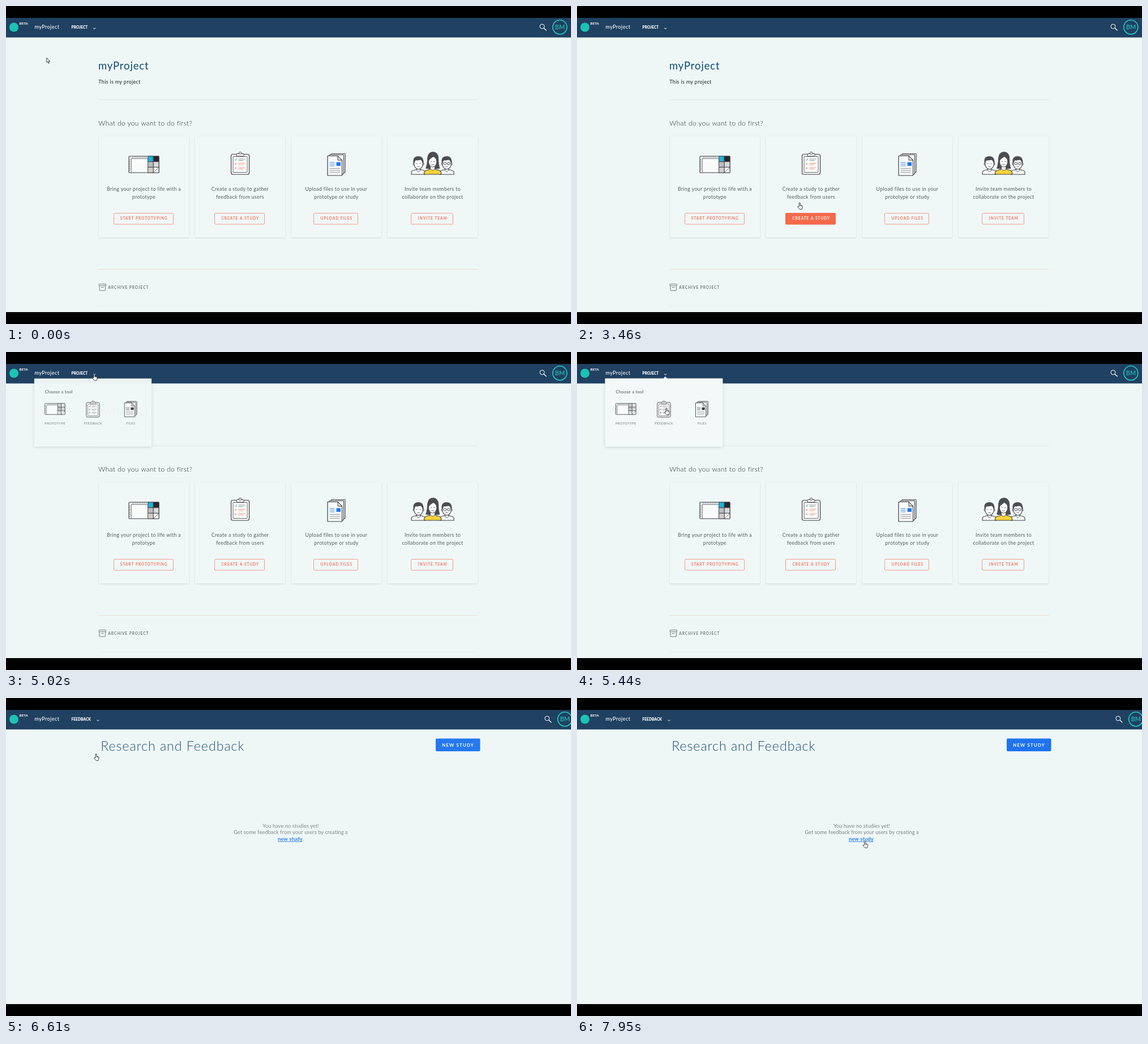
An HTML page with a canvas that plays this animation: 998 by 561 pixels, repeating every 8000 ms.

```html
<!DOCTYPE html>
<html lang="en">
<head>
<meta charset="utf-8">
<title>Project dashboard</title>
<style>
  html, body { margin: 0; width: 100%; height: 100%; overflow: hidden; background: #000; }
  canvas { display: block; width: 998px; height: 561px; }
</style>
</head>
<body>
<canvas id="stage"></canvas>
<script>
const W = 998, H = 561, LOOP = 8000;
const BG = '#eef7f6', INK = '#3b3d42', CORAL = '#f3735c', TEAL = '#1fcfc9';
const canvas = document.getElementById('stage');
const dpr = window.devicePixelRatio || 1;
canvas.width = W * dpr;
canvas.height = H * dpr;
const c = canvas.getContext('2d');

const clamp = v => Math.max(0, Math.min(1, v));
const ramp = (t, a, b) => clamp((t - a) / (b - a));
const easeOut = (p, n = 3) => 1 - (1 - p) ** n;
const smooth = p => p * p * (3 - 2 * p);
const mix = (a, b, p) => a + (b - a) * p;

function text(str, x, y, size, color, { weight = 400, space = 0, center = false, style = '' } = {}) {
  c.font = `${style} ${weight} ${size}px Lato, sans-serif`;
  c.letterSpacing = space + 'px';
  c.fillStyle = color;
  const w = center ? c.measureText(str).width - space : 0;
  c.fillText(str, x - w / 2, y);
}

function box(x, y, w, h, r, fill, stroke, lw = 1) {
  c.beginPath();
  c.roundRect(x, y, w, h, r);
  if (fill) { c.fillStyle = fill; c.fill(); }
  if (stroke) { c.strokeStyle = stroke; c.lineWidth = lw; c.stroke(); }
}

function line(color, lw, ...pts) {
  c.beginPath();
  for (let i = 0; i < pts.length; i += 2) c.lineTo(pts[i], pts[i + 1]);
  c.strokeStyle = color;
  c.lineWidth = lw;
  c.stroke();
}

function shape(d, fill, stroke, lw = 1) {
  const p = new Path2D(d);
  if (fill) { c.fillStyle = fill; c.fill(p); }
  if (stroke) { c.strokeStyle = stroke; c.lineWidth = lw; c.stroke(p); }
}

function oval(x, y, rx, ry, fill, stroke, lw = 1) {
  c.beginPath();
  c.ellipse(x, y, rx, ry, 0, 0, 7);
  if (fill) { c.fillStyle = fill; c.fill(); }
  if (stroke) { c.strokeStyle = stroke; c.lineWidth = lw; c.stroke(); }
}

function at(x, y, scale, draw) {
  c.save();
  c.translate(x, y);
  c.scale(scale, scale);
  draw();
  c.restore();
}

function shadowed(blur, dy, color, draw) {
  c.save();
  c.shadowBlur = blur * dpr;
  c.shadowOffsetY = dy * dpr;
  c.shadowColor = color;
  draw();
  c.restore();
}

// Icons are drawn around their own centre.
function boardIcon(tint = true) {
  box(-26.5, -14.5, 53, 29, 1, '#fafcfc', INK, 1.2);
  line(INK, .8, -22.5, -10.5, 7, -10.5);
  line(INK, .8, -22.5, -10.5, -22.5, 14);
  for (let x = -20; x < 7; x += 3) line(INK, .7, x, -14, x, -12);
  for (let y = -8; y < 13; y += 3) line(INK, .7, -26, y, -24, y);
  const fills = tint
    ? ['#1fb2dc', '#25272b', '#b9bdbf', '#d8d9d8', '#cfcdc8', '#fafcfc']
    : ['#c9cccd', '#e4e6e6', '#b9bdbf', '#d8d9d8', '#dcdddc', '#fafcfc'];
  fills.forEach((f, i) => box(7 + i % 2 * 9.7, -14.5 + (i >> 1) * 9.7, 9.7, 9.7, 0, f, INK, .9));
  line(INK, .8, 16.7, 14.5, 26.4, 5);
}

function clipIcon(tint = true) {
  box(-16, -16, 32, 35.5, 3, '#fafcfc', INK, 1.2);
  box(-12.5, -12, 25, 28, 1, '#fafcfc', INK, .8);
  box(-6.5, -17, 13, 4.5, 1, '#fafcfc', INK, 1);
  oval(0, -18, 2.2, 2, '#fafcfc', INK);
  [-6.5, 1, 8.5].forEach((y, i) => {
    const mark = !tint ? INK : i ? '#f0714f' : '#27a59b';
    if (i) {
      line(mark, .9, -9.5, y - 1.5, -6.5, y + 1.5);
      line(mark, .9, -9.5, y + 1.5, -6.5, y - 1.5);
    } else line(mark, 1, -9.5, y, -8, y + 1.5, -5.5, y - 2);
    const rule = tint && i ? '#f0906f' : '#85898c';
    line(rule, .9, -3, y - 1, 9, y - 1);
    line(rule, .9, -3, y + 1.5, 6, y + 1.5);
  });
}

function filesIcon(tint = true) {
  const accent = tint ? '#2377e6' : INK;
  box(-9.5, -19, 25, 33, 1, '#fafcfc', INK, 1.1);
  box(-12.5, -17, 25.5, 34, 1, '#fafcfc', INK, 1.1);
  shape('M-15.5-15H2.5L10-7.5V19.5H-15.5Z', '#fafcfc', INK, 1.2);
  shape('M2.5-15V-7.5H10Z', '#dfe3e4', INK, 1);
  box(0, -4, 7.5, 6.5, 0, accent);
  for (let i = 0; i < 3; i++) line(accent, .9, -12, -3.5 + i * 3, -3, -3.5 + i * 3);
  for (let i = 0; i < 3; i++) line('#7d858c', .9, -12, 7 + i * 3.4, 6.5, 7 + i * 3.4);
}

function man(x, glasses) {
  at(x, 0, 1, () => {
    shape('M-12.5 20V16Q-12 13.5-7 12.5L-3 11.5V8H3V11.5L7 12.5Q12 13.5 12.5 16V20Z', '#fafcfc', INK, 1.1);
    line(INK, .9, -4, 12, 0, 16, 4, 12);
    oval(-8, 1.5, 1.5, 2.2, '#fafcfc', INK, .9);
    oval(8, 1.5, 1.5, 2.2, '#fafcfc', INK, .9);
    oval(0, 1.5, 7.8, 9.5, '#fafcfc', INK, 1.1);
    shape('M-9-.5Q-10.5-9.5-4-11.5Q9-14 9-.5H7.5Q6.5-5 3-5.5Q-3-4-6.5-5L-7.5-.5Z', '#4b4d52');
    if (glasses) {
      oval(-3.2, 1, 2.5, 2.1, null, INK, .9);
      oval(3.2, 1, 2.5, 2.1, null, INK, .9);
    } else {
      oval(-2.9, 1, .7, .7, INK);
      oval(2.9, 1, .7, .7, INK);
    }
    line(INK, .8, -2, 6, 0, 6.7, 2, 6);
  });
}

function teamIcon() {
  man(-25, false);
  man(25, true);
  shape('M-12.5 9.5Q-9.5 2-9.5-9Q-8-20 1-20Q10-19 10.5-9Q10.5 3 13 9.5Q7 11 0 10Q-7 11-12.5 9.5Z', '#4b4d52');
  shape('M-15 20V16.5Q-14 13-8 12L-3 10.5V5H3V10.5L8 12Q14 13 15 16.5V20Z', '#f8d33c', INK, 1.1);
  shape('M-4 10.3V4H4V10.3Q0 15-4 10.3Z', '#fafcfc', INK, .8);
  oval(0, -2.5, 7.2, 9.5, '#fafcfc', INK, .9);
  shape('M-8-3Q-7-14 2-14Q8-13 8-3Q6-9 1-11Q-4-8-8-3Z', '#4b4d52');
  oval(-2.7, -2.5, .8, .8, INK);
  oval(2.7, -2.5, .8, .8, INK);
  line(INK, .8, -2.3, 2.5, 0, 3.3, 2.3, 2.5);
}

const cards = [
  [boardIcon, 279.5, ['Bring your project to life with a', 'prototype'], 'START PROTOTYPING', 105],
  [clipIcon, 277.5, ['Create a study to gather', 'feedback from users'], 'CREATE A STUDY', 88],
  [filesIcon, 279.5, ['Upload files to use in your', 'prototype or study'], 'UPLOAD FILES', 78],
  [teamIcon, 277, ['Invite team members to', 'collaborate on the project'], 'INVITE TEAM', 74]
];

function card(i, hover) {
  const [icon, iconY, lines, label, w] = cards[i];
  const x = 243.3 + i * 170;
  shadowed(2, .8, 'rgba(70,90,95,.22)', () => box(x - 79.5, 229.5, 159.5, 179, 1.5, '#f0f8f7'));
  at(x + .3, iconY, 1, icon);
  lines.forEach((s, n) => text(s, x, 326 + n * 13.8, 8.8, '#55595e', { space: .34, center: true }));
  const left = Math.round(x - w / 2) - .5;
  box(left, 365.5, w, 19.5, 2, null, '#f4998a');
  if (hover) {
    c.save();
    c.globalAlpha *= hover;
    box(left - .5, 365, w + 1, 20.5, 2, '#f4694a');
    c.restore();
  }
  text(label, x, 377.4, 6.5, hover > .5 ? '#fff' : CORAL, { weight: 700, space: 1, center: true });
}

function projectPage(hover) {
  text('myProject', 162.9, 112, 18.5, '#0f4973', { space: .88 });
  text('This is my project', 163.3, 137, 9, '#1d2126', { space: .3 });
  line('#e0e8e7', 1, 163, 165.5, 834, 165.5);
  text('What do you want to do first?', 163.3, 211.3, 12, '#24292e', { weight: 300, space: .35 });
  cards.forEach((_, i) => card(i, i === 1 ? hover : 0));
  line('#f0dcd3', 1, 163, 464.5, 834, 464.5);
  box(165, 493.5, 10.5, 8.5, .5, null, '#74787c');
  box(164, 490.5, 12.5, 3, .5, null, '#74787c');
  line('#74787c', 1, 168, 496.5, 172.5, 496.5);
  text('ARCHIVE PROJECT', 180.3, 498.6, 6.5, '#73777b', { weight: 700, space: .97 });
  line('#e5edec', 1, 163, 529.5, 834, 529.5);
}

function studyPage() {
  text('Research and Feedback', 167.2, 93, 23.3, '#1b4d78', { weight: 300, space: .9 });
  box(759, 71.5, 78.5, 22.5, 2, '#1f73ef');
  text('NEW STUDY', 798, 85.6, 7.8, '#fff', { weight: 700, space: 1.2, center: true });
  const grey = '#7d8387';
  text('You have no studies yet!', 503, 228.5, 9.3, grey, { space: .04, center: true });
  text('Get some feedback from your users by creating a', 503, 240.3, 9.3, grey, { space: .04, center: true });
  text('new study', 480, 252, 9.3, '#2b7de9', { weight: 700, space: .1 });
  line('#2b7de9', .9, 480, 253.5, 523.5, 253.5);
  text('.', 523.3, 252, 9.3, grey);
}

function header(t) {
  const feedback = t >= 6460;
  const dx = t >= 6030 ? 8.8 : 0;
  c.fillStyle = '#204161';
  c.fillRect(0, 21, W, 34.5);
  oval(14, 37.5, 8, 8, '#1cc3b4');
  text('BETA', 23.6, 33.3, 6.2, '#fff', { weight: 700 });
  text('myProject', 50.5, 40.3, 9, '#fff', { weight: 500, space: .42 });
  text(feedback ? 'FEEDBACK' : 'PROJECT', 115.5, 40, 6.5, '#fff', { weight: 900, space: .1 });
  const cx = feedback ? 162.5 : 156.2;
  line('#fff', 1, cx - 2.2, 38.6, cx, 40.6, cx + 2.2, 38.6);
  oval(947 + dx, 36, 4, 4, null, '#fff', 1);
  line('#fff', 1.3, 950 + dx, 39, 954.7 + dx, 43.3);
  oval(978.3 + dx, 37.3, 12.5, 12.5, null, TEAL, 1.6);
  text('BM', 978.5 + dx, 41.2, 11, TEAL, { center: true });
}

const tools = [
  [boardIcon, 86.2, 100.5, .67, 'PROTOTYPE'],
  [clipIcon, 153.5, 100.7, .73, 'FEEDBACK'],
  [filesIcon, 220.5, 100.5, .71, 'FILES']
];

function menu(t) {
  const show = easeOut(ramp(t, 4840, 5060), 2) * (1 - easeOut(ramp(t, 6060, 6360), 2));
  if (!show) return;
  const scale = mix(.88, 1, show), hot = t >= 5540;
  c.save();
  c.globalAlpha = show;
  c.translate(153.4, 106.8);
  c.scale(scale, scale);
  c.translate(-153.4, -106.8);
  shadowed(5, 1, 'rgba(60,70,70,.2)', () => box(49.5, 46.5, 208, 120.5, 1, '#f2f9f8'));
  shape('M152.5 47L156 43L159.5 47Z', '#f2f9f8');
  text('Choose a tool', 68.4, 72.6, 7.5, '#484c51', { space: .3 });
  tools.forEach(([icon, x, y, s, label], i) => {
    at(x, y, s, () => icon(false));
    const on = hot && i === 1;
    text(label, x, 127.8, 6, on ? '#33373c' : '#777b7f',
      { space: on ? .15 : .28, center: true, weight: on ? 700 : 400, style: on ? 'italic' : '' });
  });
  c.restore();
}

// time, x, y, hand pointer while leaving this point
const path = [
  [0, 71.5, 91, 0], [1490, 71.5, 91, 0], [1760, 219.5, 262, 0], [2060, 219.5, 262, 0],
  [2350, 389, 366, 1], [2430, 390, 368, 1], [3425, 390, 368, 1], [3460, 389.5, 346.5, 1],
  [3490, 340, 292, 0], [3610, 133, 41, 1], [3910, 133, 41, 1], [4090, 148, 39, 1],
  [4250, 148, 39, 1], [4500, 152, 38, 1], [5130, 152, 38, 1], [5420, 154, 98.5, 1],
  [5500, 155, 98, 1], [7180, 155, 98, 1], [7220, 161, 101, 0], [7680, 497, 268, 0],
  [7860, 503, 256, 1], [7940, 504.5, 252, 1], [LOOP, 504.5, 252, 1]
];

function cursor(t) {
  let i = 0;
  while (i < path.length - 2 && path[i + 1][0] <= t) i++;
  const [t0, x0, y0, hand] = path[i], [t1, x1, y1] = path[i + 1];
  const p = smooth(ramp(t, t0, t1));
  at(mix(x0, x1, p), mix(y0, y1, p), 1, () => {
    c.lineJoin = 'round';
    if (hand) {
      shape('M3 7.6V1.5a1 1 0 0 1 2 0V5l3.1.7q1.1.3.9 1.5l-.4 3.2q-.2.8-.4 1.9H4.3L.7 8.5Q.4 7.3 1.5 7.2Z', '#fff', '#26282b', .9);
      line('#26282b', .6, 5.2, 5.2, 5.2, 7);
      line('#26282b', .6, 7, 5.7, 7, 7.2);
    } else {
      shape('M.3.3V8.6L2.2 7L3.6 10.2L5 9.5L3.6 6.5H6.2Z', '#fff', '#26282b', .9);
    }
  });
}

function faded(alpha, draw) {
  if (alpha <= 0) return;
  c.save();
  c.globalAlpha = alpha;
  draw();
  c.restore();
}

function render(t) {
  c.setTransform(dpr, 0, 0, dpr, 0, 0);
  c.fillStyle = '#000';
  c.fillRect(0, 0, W, H);
  c.fillStyle = BG;
  c.fillRect(0, 55, W, 485);
  const hover = ramp(t, 2330, 2430) * (1 - ramp(t, 3490, 3610));
  faded(1 - ramp(t, 5650, 6010), () => projectPage(hover));
  faded(easeOut(ramp(t, 6050, 6900)), studyPage);
  header(t);
  menu(t);
  cursor(t);
}

const start = performance.now();
function tick() {
  render((performance.now() - start) % LOOP);
  requestAnimationFrame(tick);
}
tick();
</script>
</body>
</html>
```
